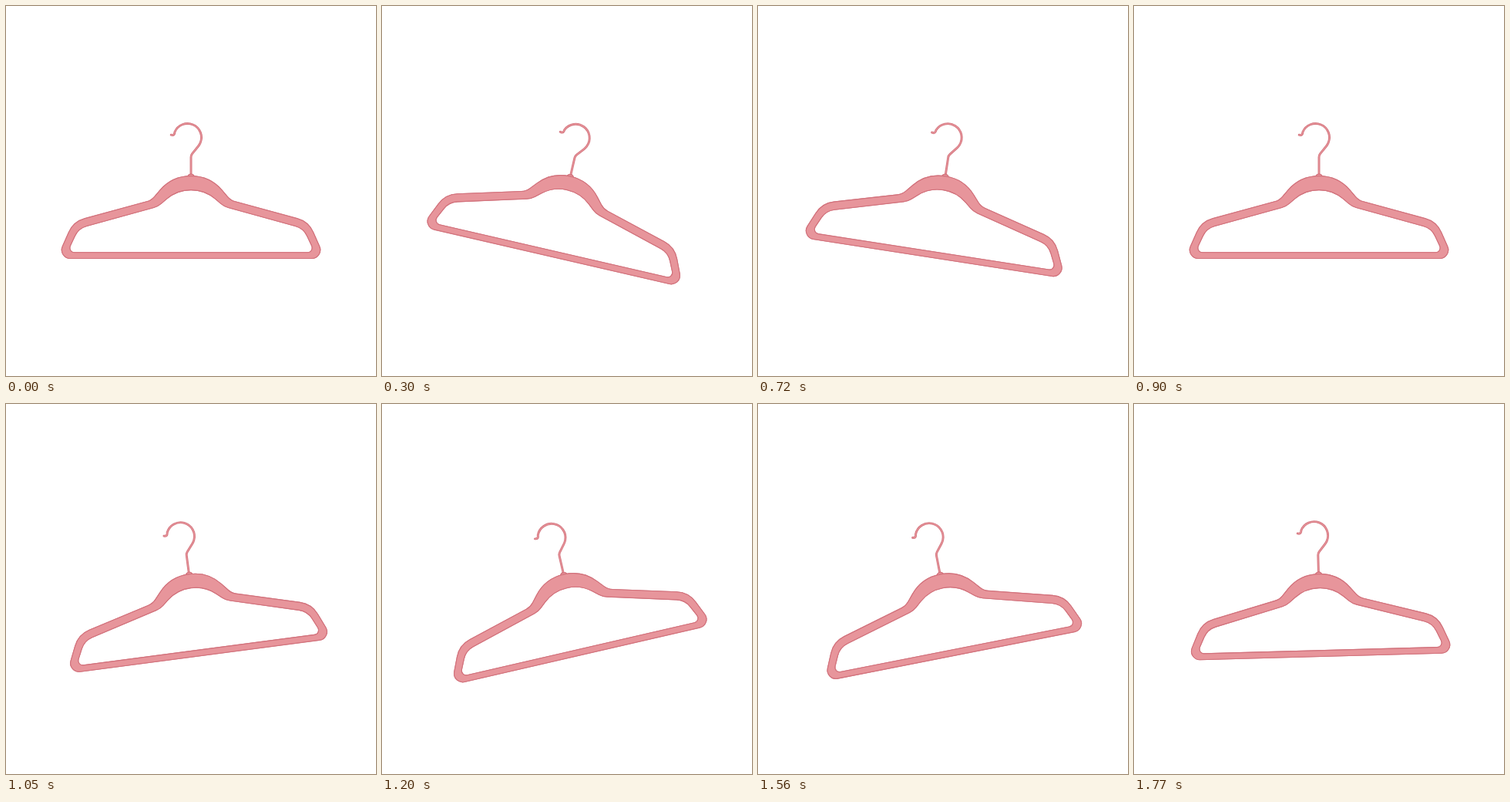
Recreate the animation shown at these times as an HTML page with a canvas. Size 480 by 480 pixels, loop 1.8 s.

```html
<!DOCTYPE html>
<html lang="en">
<head>
<meta charset="utf-8">
<title>Swinging hanger</title>
<style>
  html, body { margin: 0; width: 100%; height: 100%; overflow: hidden; background: #fff; }
  canvas { display: block; width: 100vw; height: 100vh; }
</style>
</head>
<body>
<canvas id="stage"></canvas>
<script>
  const SIZE = 480, MID = SIZE / 2;
  const LOOP = 1800, STEP = 30, SWING = Math.PI / 12;
  const FILL = '#e7959b', EDGE = '#d2727c';

  const canvas = document.getElementById('stage');
  const ctx = canvas.getContext('2d');
  const scale = window.devicePixelRatio || 1;
  canvas.width = canvas.height = SIZE * scale;

  // Symmetric outline from the rounded corners [x, y, radius] of its left half
  function addOutline(path, left) {
    const right = left.map(([x, y, r]) => [SIZE - x, y, r]).reverse();
    const corners = [...left, ...right];
    path.moveTo(MID, left[0][1]);
    corners.forEach(([x, y, r], i) => {
      const [nextX, nextY] = corners[(i + 1) % corners.length];
      path.arcTo(x, y, nextX, nextY, r);
    });
    path.closePath();
  }

  // Corners in order: dome, shoulder, arm end, foot
  const body = new Path2D();
  addOutline(body, [[215.5, 220.7, 52], [188.5, 252.2, 20], [87.5, 279.7, 32], [66.5, 327.5, 11]]);
  addOutline(body, [[222, 238.6, 48], [197, 260, 25], [94, 288.4, 24], [79.3, 319.8, 6]]);

  const collar = new Path2D();
  collar.arc(MID, 222.8, 4.7, 0, 2 * Math.PI);

  const hook = new Path2D();
  hook.moveTo(214.2, 167.2);
  hook.arcTo(218, 168, 219.2, 163, 3);
  hook.arc(235.5, 170.5, 18, 1.13 * Math.PI, 2.22 * Math.PI);
  hook.arcTo(MID, 193.5, MID, 219, 7);
  hook.lineTo(MID, 219);

  function stroke(path, color, width) {
    ctx.strokeStyle = color;
    ctx.lineWidth = width;
    ctx.stroke(path);
  }

  function drawHanger() {
    stroke(hook, EDGE, 2.9);
    stroke(hook, FILL, 1.3);
    for (const shape of [collar, body]) {
      stroke(shape, EDGE, 1.2);
      ctx.fillStyle = FILL;
      ctx.fill(shape, 'evenodd');
      stroke(shape, EDGE, 1.1);
    }
  }

  function draw(ms) {
    const t = Math.floor((ms % LOOP) / STEP) * STEP;
    ctx.setTransform(scale, 0, 0, scale, 0, 0);
    ctx.fillStyle = '#fff';
    ctx.fillRect(0, 0, SIZE, SIZE);
    ctx.translate(MID, MID);
    ctx.rotate(SWING * Math.sin(2 * Math.PI * t / LOOP));
    ctx.translate(-MID, -MID);
    ctx.lineCap = ctx.lineJoin = 'round';
    drawHanger();
  }

  const begin = performance.now();
  function tick() {
    draw(performance.now() - begin);
    requestAnimationFrame(tick);
  }
  draw(0);
  requestAnimationFrame(tick);
</script>
</body>
</html>
```
